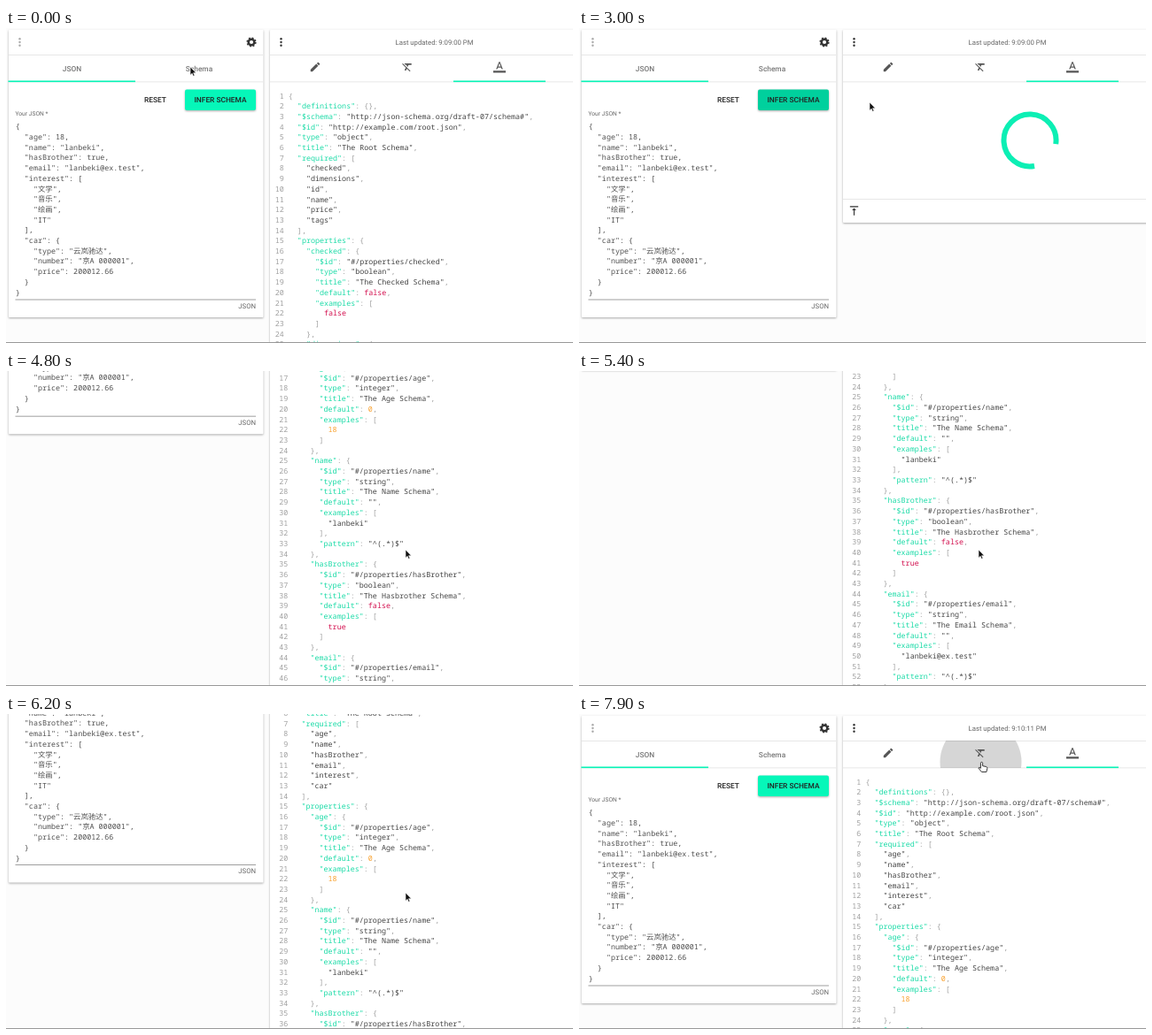
An HTML page for the animation above (8000 ms loop, 640 by 356 pixels).

```html
<!DOCTYPE html>
<html lang="en">
<head>
<meta charset="utf-8">
<title>Schema inference</title>
<style>
html, body { margin: 0; width: 100%; height: 100%; overflow: hidden; background: #fcfcfc; }
#stage { position: relative; width: 640px; height: 356px; overflow: hidden; text-rendering: geometricPrecision; }
#page, svg, pre { position: absolute; left: 0; top: 0; }
svg { overflow: visible; }
svg text { font: 500 8.35px Roboto, sans-serif; fill: #222; }
svg .soft { fill: #777; }
svg .info { font-weight: 400; font-size: 7.75px; fill: #666; }
.card { fill: #fff; filter: drop-shadow(0 1px 1.3px rgba(0, 0, 0, .33)); }
.rule { fill: #e2e2e2; }
.accent { fill: #06f3b6; }
pre { margin: 0; font: 8.38px/11.7px 'Noto Sans Mono', 'Noto Sans CJK SC', 'Noto Sans CJK', monospace; color: #505050; }
#input { left: 10.8px; top: 106.3px; }
#gutter, #code { top: 71.5px; }
#gutter { width: 320px; text-align: right; color: #a0a0a0; }
#code { color: #454545; }
.key { color: #1bdba7; }
.mark { color: #a0a0a0; }
.bool { color: #d3104f; font-weight: 500; }
.num { color: #f9a02c; }
</style>
</head>
<body>
<div id="stage">
  <div id="page">
    <svg width="640" height="356">
      <defs>
        <clipPath id="buttonClip"><rect x="202" y="69.5" width="80" height="23.5" rx="2"/></clipPath>
        <clipPath id="tabClip"><rect x="401" y="30" width="104" height="31"/></clipPath>
        <g id="dots"><circle cy="-3.7" r="1.2"/><circle r="1.2"/><circle cy="3.7" r="1.2"/></g>
      </defs>

      <rect class="card" x="3" y="2" width="287.5" height="325" rx="1"/>
      <rect class="rule" x="3" y="30" width="287" height=".8"/>
      <rect class="rule" x="3" y="60.5" width="287" height=".8"/>
      <rect class="accent" x="2.5" y="59.5" width="143.5" height="1.6"/>
      <use href="#dots" x="15.5" y="16" fill="#aaa"/>
      <g transform="translate(277 16)" fill="none" stroke="#333">
        <circle r="3.3" stroke-width="2.4"/>
        <circle r="4.8" stroke-width="1.6" stroke-dasharray="1.9 1.87"/>
      </g>
      <text class="soft" x="74.5" y="49" text-anchor="middle">JSON</text>
      <text class="soft" x="218" y="49" text-anchor="middle">Schema</text>
      <text x="168.5" y="84" text-anchor="middle">RESET</text>
      <rect id="button" class="card" x="202" y="69.5" width="80" height="23.5" rx="2"/>
      <circle id="buttonRipple" cx="242" cy="82" clip-path="url(#buttonClip)"/>
      <text x="242" y="84" text-anchor="middle">INFER SCHEMA</text>
      <text class="info" x="10.5" y="99" style="font-size:6.7px">Your JSON *</text>
      <rect x="10.5" y="306.6" width="271.5" height=".8" fill="#888"/>
      <text class="info" x="282" y="316.5" text-anchor="end">JSON</text>

      <rect id="result" class="card" x="298" y="2" width="360" rx="1"/>
      <rect class="rule" x="298" y="30" width="342" height=".8"/>
      <rect class="rule" x="298" y="60.5" width="342" height=".8"/>
      <circle id="tabRipple" cx="453.5" cy="54" fill-opacity=".16" clip-path="url(#tabClip)"/>
      <rect class="accent" x="505" y="59.5" width="104" height="1.6"/>
      <use href="#dots" x="310.5" y="16" fill="#333"/>
      <text id="updated" class="info" x="483.5" y="18.7" text-anchor="middle"></text>
      <g fill="#555">
        <path transform="translate(342 37) scale(.585)" d="M3 17.25V21h3.75L17.81 9.94l-3.75-3.75ZM20.71 7.04q.7-.7 0-1.41l-2.34-2.34q-.7-.7-1.41 0l-1.83 1.83 3.75 3.75Z"/>
        <path transform="translate(446 37) scale(.585)" d="M3.27 5 2 6.27l6.97 6.97L6.5 19h3l1.57-3.66L16.73 21 18 19.73ZM6 5v.18L8.82 8h2.4l-.72 1.68 2.1 2.1L14.21 8H20V5Z"/>
        <path transform="translate(550 36.5) scale(.585)" d="M0 20h24v4H0ZM11 3 5.5 17h2.25l1.12-3h6.25l1.12 3h2.25L13 3Zm-1.38 9L12 5.67 14.38 12Z"/>
      </g>
      <g id="loader">
        <path id="spinner" fill="none" stroke="#0cefb4" stroke-width="6"/>
        <rect class="rule" x="298" y="193" width="342" height=".8"/>
        <path transform="translate(303.5 199.5) scale(.585)" fill="#333" d="M8 11h3v10h2V11h3l-4-4ZM4 3v2h16V3Z"/>
      </g>
    </svg>
    <pre id="input"></pre>
    <pre id="gutter"></pre>
    <pre id="code"></pre>
  </div>
  <svg width="640" height="356">
    <rect y="355" width="640" height="1" fill="#999"/>
    <g id="cursor" stroke-linejoin="round">
      <path id="arrow" transform="scale(.92)" fill="#111" stroke="#fff" stroke-width=".6" d="M0 0V10L2.3 7.9 3.7 11.2 5.3 10.5 3.9 7.3H7Z"/>
      <path id="hand" fill="#fff" stroke="#222" stroke-width=".9" d="M-1.1 1a1.1 1.1 0 0 1 2.2 0v3.2l4 .8q1.5.5 1.2 2L5.4 11H0L-3.6 6.6q.8-1.4 2.5.2Z"/>
    </g>
  </svg>
</div>
<script>
const LOOP = 8000, LOADING = 1800, LOADED = 3300;
const $ = id => document.getElementById(id);
const attrs = (id, values) => Object.entries(values).forEach(([k, v]) => $(id).setAttribute(k, v));
const show = (id, on) => { $(id).style.display = on ? '' : 'none'; };

const person = {
  age: 18, name: 'lanbeki', hasBrother: true, email: 'lanbeki@ex.test',
  interest: ['文学', '音乐', '绘画', 'IT'],
  car: { type: '云岚驰达', number: '京A 000001', price: 200012.66 }
};

const titled = name => `The ${name[0].toUpperCase()}${name.slice(1).toLowerCase()} Schema`;
const node = (path, type, rest) =>
  ({ $id: '#/properties/' + path, type, title: titled(path.split('/').pop()), ...rest });
const text = (path, ...examples) =>
  node(path, 'string', { default: '', examples, pattern: '^(.*)$' });
const root = (required, properties) => ({
  definitions: {}, $schema: 'http://json-schema.org/draft-07/schema#',
  $id: 'http://example.com/root.json', type: 'object', title: titled('root'), required, properties
});

const before = root(['checked', 'dimensions', 'id', 'name', 'price', 'tags'], {
  checked: node('checked', 'boolean', { default: false, examples: [false] }),
  dimensions: node('dimensions', 'object')
});
const after = root(Object.keys(person), {
  age: node('age', 'integer', { default: 0, examples: [18] }),
  name: text('name', person.name),
  hasBrother: node('hasBrother', 'boolean', { default: false, examples: [true] }),
  email: text('email', person.email),
  interest: node('interest', 'array', { items: text('interest/items', ...person.interest) }),
  car: node('car', 'object')
});

const format = value => JSON.stringify(value, null, 2);
const TOKEN = /("[^"]*")(?=:)|("[^"]*")|(true|false)|(\d+)|([{}\[\]:,]+)/g;
const highlight = source => source.replace(TOKEN, (all, key, string, bool, num) =>
  string ? all : `<span class="${key ? 'key' : bool ? 'bool' : num ? 'num' : 'mark'}">${all}</span>`);

// Each view: document, time stamp, and the x of the code column.
const views = [[before, '9:09:00', 318.8], [after, '9:10:11', 323.4]].map(([schema, clock, x]) => {
  const source = format(schema);
  return {
    html: highlight(source), x, clock: `Last updated: ${clock} PM`,
    numbers: source.split('\n').map((_, i) => i + 1).join('\n')
  };
});
$('input').textContent = format(person);

const clamp = x => Math.max(0, Math.min(1, x));
const smooth = x => x * x * (3 - 2 * x);
const linear = x => x;

// Keys are [time, ...values].
function track(keys, t, ease) {
  const i = keys.findIndex(k => k[0] > t);
  if (i < 0) return keys[keys.length - 1].slice(1);
  if (i === 0) return keys[0].slice(1);
  const [a, b] = [keys[i - 1], keys[i]];
  const p = ease((t - a[0]) / (b[0] - a[0]));
  return a.slice(1).map((v, j) => v + (b[j + 1] - v) * p);
}

const pointerKeys = [
  [50, 208, 44], [900, 239.5, 80], [1900, 239.5, 80], [2700, 328, 84],
  [3100, 328, 84], [3800, 451, 202], [6850, 451, 202], [7650, 454.5, 54.5]
];
const scrollKeys = [
  [3850, 0], [4800, 255.8], [4900, 262], [5050, 262], [5800, 403.5],
  [5950, 404], [6200, 137], [6400, 32], [6600, 0]
];

function spinnerPath(t) {
  const u = (t - 2500) / 1000, n = Math.floor(u), f = u - n;
  const tail = 80 + 180 * (u - .5) + 270 * (n + smooth(clamp(2 * f - 1)));
  const length = 18 + 270 * (smooth(clamp(2 * f)) - smooth(clamp(2 * f - 1)));
  const point = deg => {
    const a = deg * Math.PI / 180;
    return `${509 + 29.5 * Math.cos(a)} ${127 + 29.5 * Math.sin(a)}`;
  };
  return `M${point(tail)}A29.5 29.5 0 ${length > 180 ? 1 : 0} 1 ${point(tail + length)}`;
}

let currentView;
function setView(view) {
  if (view === currentView) return;
  currentView = view;
  $('code').innerHTML = view.html;
  $('code').style.left = view.x + 'px';
  $('gutter').textContent = view.numbers;
  $('gutter').style.width = view.x - 5 + 'px';
  $('updated').textContent = view.clock;
}

function draw(t) {
  const loading = t >= LOADING && t < LOADED;
  setView(views[t < LOADED ? 0 : 1]);
  show('code', !loading);
  show('gutter', !loading);
  show('loader', loading);
  attrs('result', { height: loading ? 218 : 900 });
  attrs('spinner', { d: spinnerPath(t) });

  const [scroll] = track(scrollKeys, t, linear);
  $('page').style.transform = `translateY(${-scroll}px)`;

  const [x, y] = track(pointerKeys, t, smooth);
  const onButton = x > 202 && x < 282 && y > 69 && y < 93;
  const onTab = x > 401 && y < 61;
  attrs('cursor', { transform: `translate(${x} ${y})` });
  show('hand', onButton || onTab);
  show('arrow', !onButton && !onTab);

  const active = onButton || (t > 1300 && t < LOADED);
  $('button').style.fill = active ? '#00d09d' : '#06f7b9';
  attrs('buttonRipple', {
    r: 47 * clamp((t - 1300) / 450),
    'fill-opacity': .1 * (1 - clamp((t - 1700) / 300))
  });
  attrs('tabRipple', { r: 46 * clamp((t - 7720) / 180) });
}

function tick() {
  draw(performance.now() % LOOP);
  requestAnimationFrame(tick);
}
tick();
</script>
</body>
</html>
```
